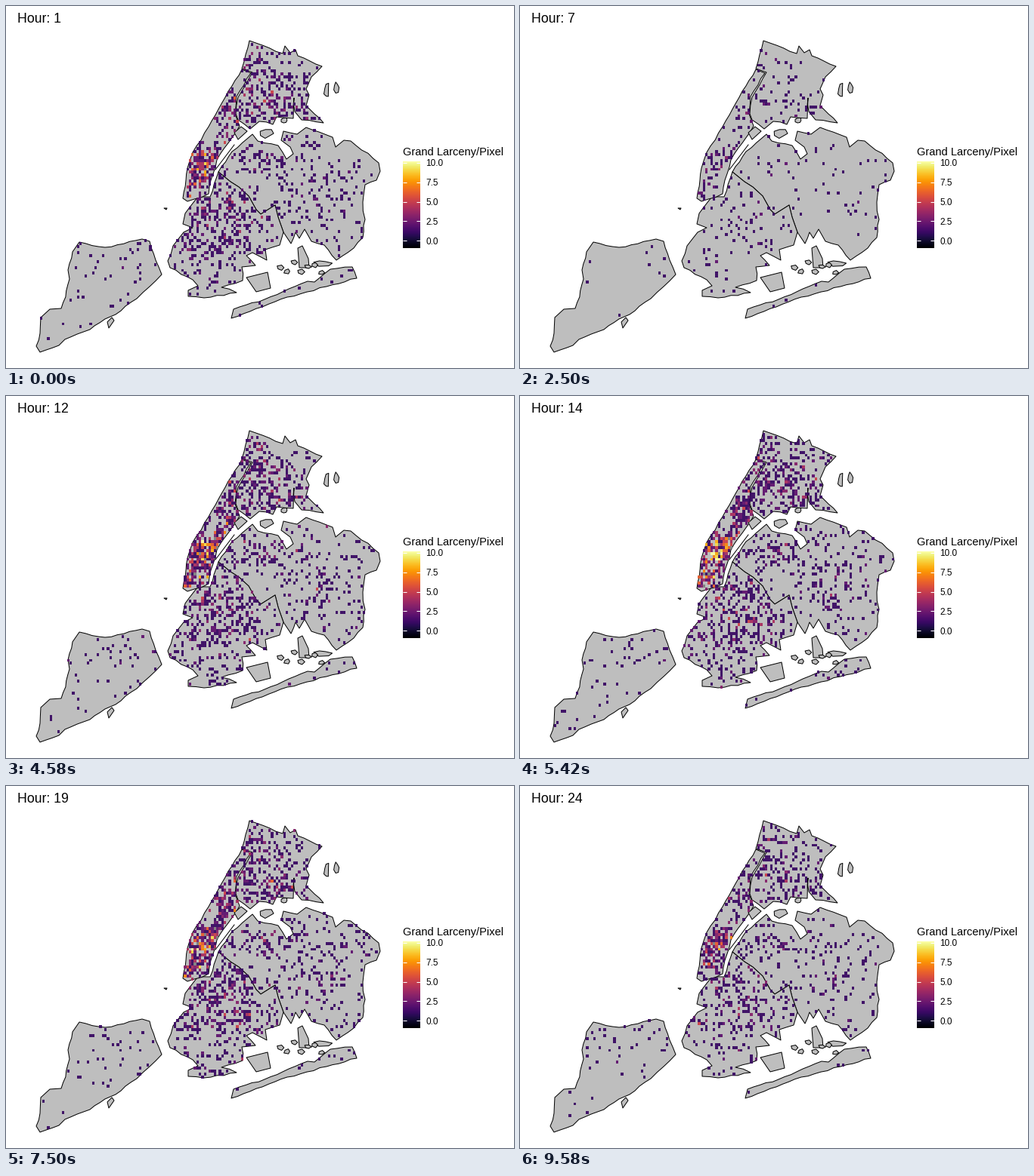
Write a matplotlib script that moves like this. It is 672 by 480 pixels and loops after 10 s.

```python
import numpy as np
import matplotlib.pyplot as plt
from matplotlib.animation import FuncAnimation
from matplotlib.patches import Polygon
from matplotlib.path import Path

W, H, DPI = 672, 480, 96
LOOP, STEP, HOURS = 10000, 40, 24
X0, Y0, CELL_W, CELL_H = 38.1, 45.68, 3.284, 3.94
COLS, ROWS = 139, 104

plt.rcParams["font.family"] = "Liberation Sans"
fig = plt.figure(figsize=(W / DPI, H / DPI), dpi=DPI, facecolor="white")
ax = fig.add_axes([0, 0, 1, 1])
ax.axis("off")
rng = np.random.default_rng(7)


# ---- Map -----------------------------------------------------------------
def shore(keys, rough=0.6, step=8):
    """Join key points with a slightly ragged coastline."""
    out = []
    for a, b in zip(np.array(keys[:-1], float), np.array(keys[1:], float)):
        d = b - a
        length = np.hypot(*d)
        normal = np.array([-d[1], d[0]]) / length
        n = max(1, int(length / step))
        for k in range(n):
            wobble = rough * rng.normal() if k else 0
            out.append(tuple(a + d * k / n + normal * wobble))
    return out + [tuple(keys[-1])]


def blob(x, y, rx, ry, n=7):
    """A small irregular island."""
    t = 2 * np.pi * np.arange(n) / n
    r = rng.uniform(0.6, 1.15, n)
    return list(zip(x + rx * r * np.cos(t), y + ry * r * np.sin(t)))


staten_shore = shore([
    (40, 451), (45, 459), (70, 450), (78, 442), (111, 429), (131, 415),
    (145, 409), (158, 398), (173, 388), (190, 372), (206, 356), (198, 337),
    (190, 312), (180, 309), (131, 320), (97, 313), (88, 326), (82, 350),
    (84, 362), (73, 401), (58, 402), (46, 413), (45, 434), (40, 451)])
bronx_shore = shore([
    (322, 46), (366, 63), (369, 53), (376, 62), (383, 58), (386, 66),
    (418, 80), (404, 94), (397, 110), (401, 118), (397, 132), (420, 155),
    (391, 151), (382, 140), (381, 122), (380, 149), (358, 147), (353, 157),
    (335, 153), (323, 163), (307, 151), (304, 143), (307, 121), (326, 88),
    (312, 83), (322, 46)])
manhattan_shore = shore([
    (312, 84), (324, 89), (305, 120), (303, 143), (309, 159), (279, 204),
    (271, 231), (268, 249), (240, 259), (234, 255), (240, 215), (247, 194),
    (268, 160), (290, 121), (312, 84)])
border = [(281, 220), (297, 233), (308, 240), (321, 252), (331, 270),
          (337, 276), (356, 264), (360, 280), (367, 300)]
queens_shore = border + shore([
    (377, 315), (383, 300), (388, 308), (395, 296), (404, 312), (421, 317),
    (437, 337), (460, 321), (472, 307), (475, 283), (472, 260), (475, 237),
    (490, 231), (495, 219), (493, 208), (456, 179), (447, 178), (436, 187),
    (432, 174), (397, 161), (385, 170), (367, 166), (364, 178), (376, 187),
    (380, 196), (371, 203), (360, 185), (333, 179), (326, 170), (299, 193),
    (281, 220)])
brooklyn_shore = border + shore([
    (362, 317), (343, 323), (345, 337), (326, 327), (318, 331), (330, 344),
    (312, 346), (313, 364), (285, 373), (305, 380), (262, 387), (241, 385),
    (241, 377), (254, 371), (247, 363), (217, 347), (214, 338), (221, 318),
    (235, 300), (247, 294), (234, 289), (237, 275), (253, 254), (270, 253),
    (281, 220)])
rockaway_shore = shore([
    (298, 414), (301, 402), (342, 389), (399, 365), (408, 366), (429, 349),
    (458, 346), (464, 361), (424, 372), (372, 386), (298, 414)])
islands = [
    [(134, 419), (140, 413), (143, 417), (136, 427)],
    [(209, 268), (213, 268), (212, 270)],
    [(302, 168), (311, 160), (319, 166), (307, 177)],
    [(318, 360), (346, 353), (350, 374), (331, 379)],
    [(386, 321), (392, 318), (400, 335), (401, 347), (388, 347)],
    blob(345, 169, 9, 6), blob(368, 152, 6, 5), blob(424, 112, 4, 11),
    blob(437, 108, 4, 8), blob(417, 341, 14, 4),
]
# Marsh islands scattered over the bay
for k in range(7):
    islands.append(blob(363 + 9 * k, 347 + 7 * np.sin(2.4 * k), 5, 3.5, 5))

for pts in [staten_shore, bronx_shore, queens_shore, brooklyn_shore,
            manhattan_shore, rockaway_shore] + islands:
    ax.add_patch(Polygon(pts, closed=True, fc="#bebebe", ec="black", lw=0.75,
                         joinstyle="round", zorder=1))
ax.plot([277, 302], [217, 184], color="black", lw=0.75, zorder=1)

# ---- Incident density ----------------------------------------------------
gx, gy = np.meshgrid(X0 + CELL_W * (np.arange(COLS) + 0.5),
                     Y0 + CELL_H * (np.arange(ROWS) + 0.5))
centres = np.column_stack([gx.ravel(), gy.ravel()])
patchy = rng.gamma(1.2, 1 / 1.2, gx.shape)


def spot(x, y, sx, sy, tilt=0.0):
    c, s = np.cos(np.radians(tilt)), np.sin(np.radians(tilt))
    u, v = (gx - x) * c + (gy - y) * s, (gy - y) * c - (gx - x) * s
    return np.exp(-0.5 * ((u / sx) ** 2 + (v / sy) ** 2))


def field(pts, density, mean=1.0):
    mask = Path(pts).contains_points(centres).reshape(gx.shape)
    f = mask * density * patchy
    return mean * f / f[mask].mean()


park = 1 - 0.97 * (spot(272, 174, 5, 15, 32) > 0.5)
day_core = field(manhattan_shore,
                 park * (0.6 + 3 * spot(260, 211, 9, 32, 30)), 1.9)
night_core = field(manhattan_shore,
                   park * (0.08 + 1.3 * spot(296, 138, 14, 26)
                           + 3.4 * spot(257, 217, 10, 20, 15)), 1.1)
outer = (
    field(bronx_shore, 0.4 + spot(325, 105, 20, 38)
          + 0.8 * spot(365, 130, 18, 18), 0.46)
    + field(brooklyn_shore, 0.55 + 1.2 * spot(292, 285, 28, 30)
            + 5 * spot(244, 318, 4, 4) + 2.5 * spot(264, 267, 6, 8)
            + 2 * spot(308, 248, 6, 5), 0.40)
    + field(queens_shore, 0.5 + 3 * spot(346, 210, 14, 9)
            + spot(300, 200, 20, 15) + 1.4 * spot(412, 250, 22, 22)
            + 7 * spot(387, 201, 3, 4), 0.17)
    + field(staten_shore, 0.6 + 1.2 * spot(150, 330, 45, 25), 0.05)
    + field(rockaway_shore, 0.3 + spot(425, 364, 35, 20), 0.08))


def counts(hour):
    # Lull before dawn, slow fall towards midnight
    rhythm = (1 - 0.8 * np.exp(-((hour - 5.6) / 3.8) ** 4)
              - 0.35 * np.exp(-((hour - 24.5) / 2.5) ** 2))
    night = 0.5 + 0.5 * np.cos(2 * np.pi * (hour - 3) / 24)
    rate = rhythm * (outer + night * night_core + (1 - night) * day_core)
    n = np.random.default_rng(300 + hour).poisson(rate)
    return np.ma.masked_equal(n, 0)


grids = [counts(hour) for hour in range(1, HOURS + 1)]
cmap = plt.get_cmap("inferno").copy()
cmap.set_over("#7f7f7f")
cmap.set_bad((0, 0, 0, 0))
cells = ax.imshow(grids[0], cmap=cmap, vmin=-1, vmax=10, alpha=0.94,
                  extent=(X0, X0 + COLS * CELL_W, Y0 + ROWS * CELL_H, Y0),
                  interpolation="nearest", aspect="auto", zorder=2)

# ---- Legend and title ----------------------------------------------------
LEFT, RIGHT, TOP, BOTTOM, TICK = 525, 548, 206, 321, 4.6
ax.text(LEFT, 198, "Grand Larceny/Pixel", size=11)
ax.imshow(np.linspace(1, 0, 300)[:, None], cmap="inferno", vmin=0, vmax=1,
          extent=(LEFT, RIGHT, BOTTOM, TOP), aspect="auto", zorder=2)
for v in np.arange(0, 10.1, 2.5):
    y = 311.3 - 10.36 * v
    for x in (LEFT, RIGHT - TICK):
        ax.plot([x, x + TICK], [y, y], color="white", lw=0.8,
                solid_capstyle="butt", zorder=3)
    ax.text(555.3, y + 4.3, f"{v:.1f}", size=8.8)

title = ax.text(15, 22, "Hour: 1", size=13.2)
ax.set_xlim(0, W)
ax.set_ylim(H, 0)


def update(i):
    # Each hour starts with the step that contains its first moment
    k = int((i * STEP + STEP - 4) * HOURS / LOOP) % HOURS
    title.set_text(f"Hour: {k + 1}")
    cells.set_data(grids[k])
    return title, cells


anim = FuncAnimation(fig, update, frames=LOOP // STEP, interval=STEP,
                     repeat=True, repeat_delay=0, blit=False)
plt.show()
```
